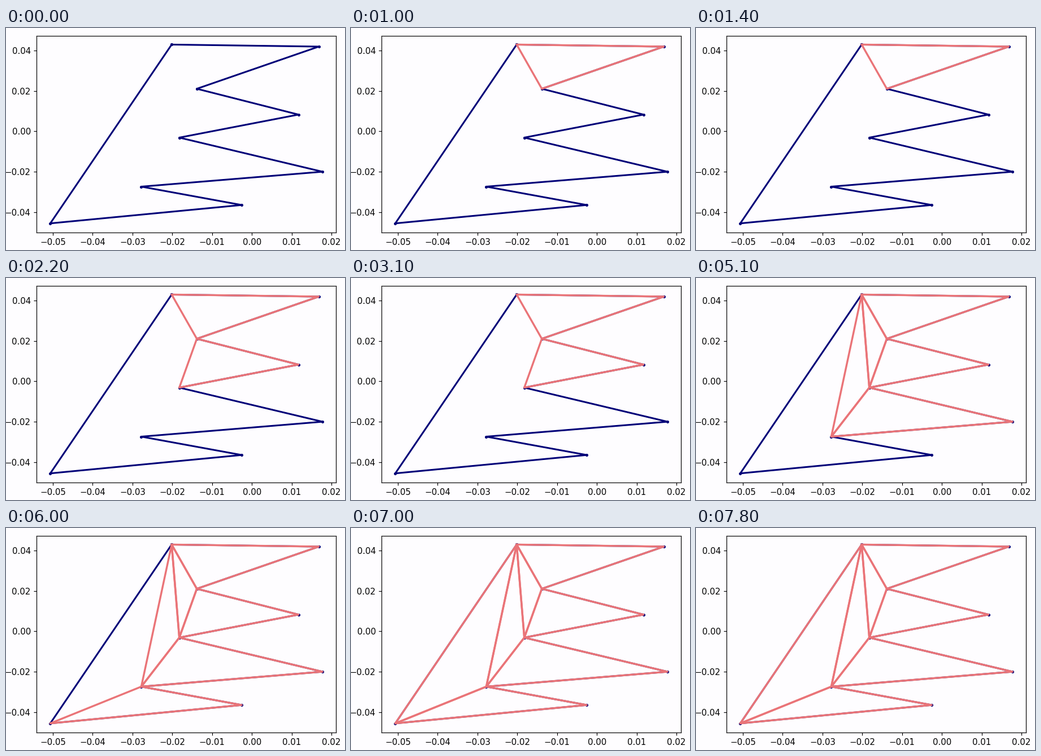
Animation of 600 by 394 pixels, one loop 8 s. Source, as a matplotlib script:

```python
import matplotlib.pyplot as plt
from matplotlib.animation import FuncAnimation
from matplotlib.ticker import MultipleLocator

W, H, DPI = 600, 394, 100
STEP, LOOP = 100, 8000  # ms
K = 1.085               # size factor against the default style
PAPER, NAVY, CORAL = "#fefdff", "#000078", "#ea7478"
STARTS = [1.0, 2.0, 3.2, 4.0, 5.0, 6.0, 7.0]  # s, one per triangle

# Corners in clockwise order
POLYGON = [
    (-0.02016, 0.0430), (0.0168, 0.0420), (-0.01384, 0.0211),
    (0.01169, 0.0083), (-0.01824, -0.0031), (0.01772, -0.0200),
    (-0.02779, -0.0274), (-0.00257, -0.0365), (-0.05065, -0.0456),
]

style = {"font.family": "DejaVu Sans", "font.size": 10 * K, "axes.linewidth": 0.8 * K}
for axis in "xy":
    style |= {f"{axis}tick.major.size": 3.5 * K,
              f"{axis}tick.major.pad": 3.5 * K,
              f"{axis}tick.major.width": 0.8 * K}
plt.rcParams.update(style)


def turns_right(a, b, c):
    return (b[0] - a[0]) * (c[1] - b[1]) < (b[1] - a[1]) * (c[0] - b[0])


def clip_ears(points):
    """Cut off the first convex corner after the start until nothing is left."""
    rest = list(points)
    while len(rest) > 2:
        i = next(i for i in range(1, len(rest) - 1)
                 if turns_right(*rest[i - 1:i + 2]))
        yield rest[i - 1:i + 2]
        del rest[i]


def draw_loop(points, **look):
    return ax.plot(*zip(*points, points[0]), solid_capstyle="round", **look)[0]


fig = plt.figure(figsize=(W / DPI, H / DPI), dpi=DPI, facecolor=PAPER)
left, right, top, bottom = 54.3, 584.2, 13.55, 362.6
ax = fig.add_axes([left / W, 1 - bottom / H, (right - left) / W, (bottom - top) / H],
                  facecolor=PAPER)
ax.xaxis.set_major_locator(MultipleLocator(0.01))
ax.yaxis.set_major_locator(MultipleLocator(0.02))

draw_loop(POLYGON, color=NAVY, lw=2.2, marker="o", ms=3.7, mew=0)
triangles = [draw_loop(ear, color=CORAL, lw=2.45) for ear in clip_ears(POLYGON)]


def update(frame):
    now = frame * STEP / 1000
    for start, line in zip(STARTS, triangles):
        line.set_visible(now >= start)
    return triangles


anim = FuncAnimation(fig, update, frames=LOOP // STEP, interval=STEP,
                     repeat=True, repeat_delay=0, blit=False)
plt.show()
```
